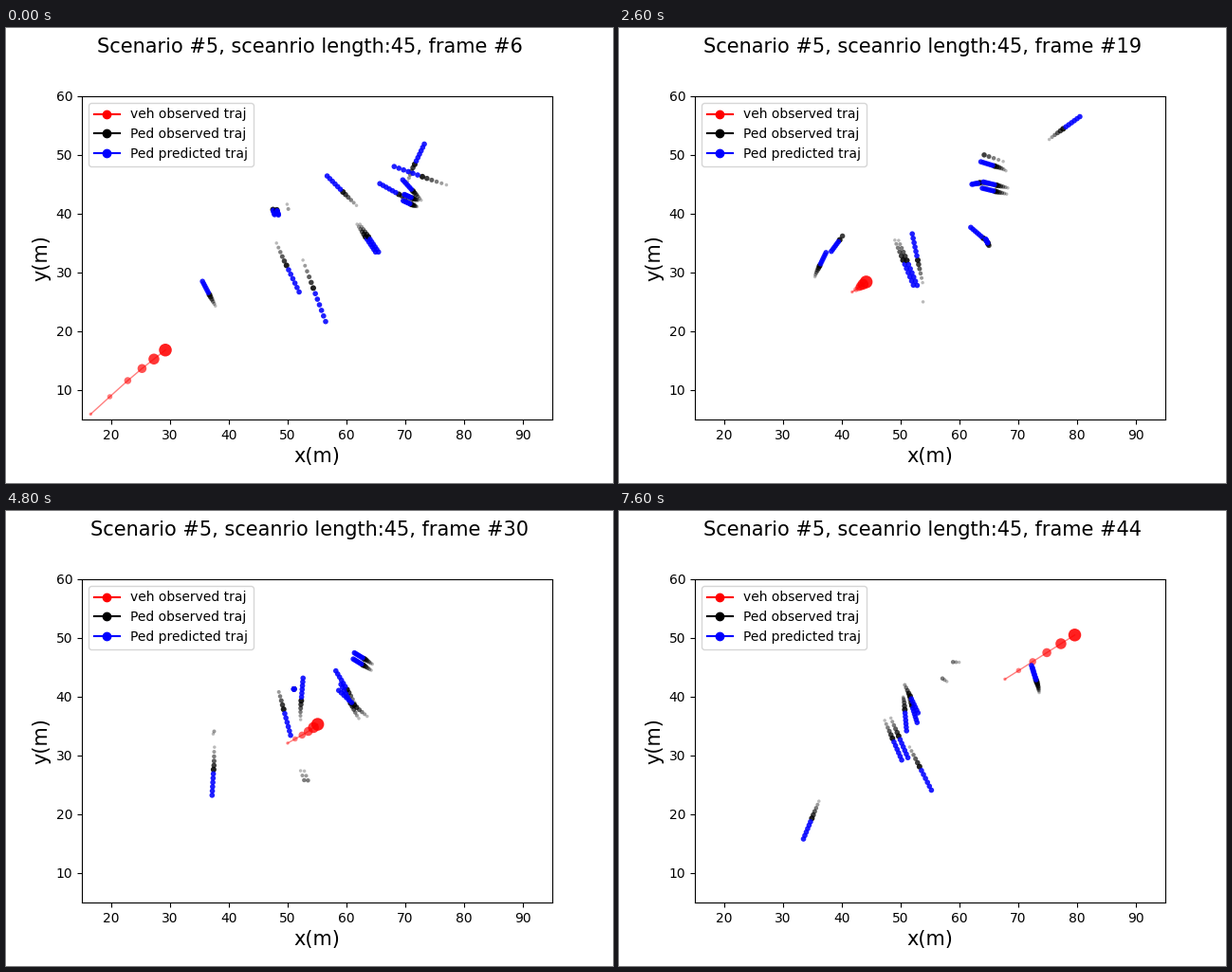
These frames come from a looping animation (640 by 480 pixels, 7800 ms). A matplotlib script:

```python
import numpy as np
import matplotlib.pyplot as plt
from matplotlib.animation import FuncAnimation

FIRST, LAST, WINDOW, AHEAD = 6, 44, 6, 6
RED, BLACK, BLUE = (1, 0, 0), (0, 0, 0), (0, 0, 1)


class Path:
    """Smooth walk through a few (step, x, y) waypoints."""

    def __init__(self, *knots):
        self.t, *xy = np.array(knots, float).T
        self.p = np.stack(xy, axis=1)
        self.v = np.gradient(self.p, self.t, axis=0)
        self.born, self.gone = self.t[0], self.t[-1]

    def at(self, step):
        step = np.clip(step, self.t[0], self.t[-1])
        k = np.clip(np.searchsorted(self.t, step, "right") - 1, 0, len(self.t) - 2)
        h = np.asarray(self.t[k + 1] - self.t[k])[..., None]
        u = np.asarray(step - self.t[k])[..., None] / h
        rise = u * u * (3 - 2 * u)
        return (self.p[k] * (1 - rise) + self.p[k + 1] * rise
                + h * u * (1 - u) * (self.v[k] * (1 - u) - self.v[k + 1] * u))

    def beside(self, dx, dy, gone=LAST):
        """A companion walking at a fixed offset."""
        mate = Path(*np.column_stack([self.t, self.p + (dx, dy)]))
        mate.gone = min(gone, self.gone)
        return mate

    def forecast(self, step):
        ref = max(step, self.born + 2)
        speed = (self.at(ref) - self.at(ref - 2)) / 2
        reach = min(AHEAD, 1 + 2 * (step - self.born))
        return self.at(step) + speed * reach * np.arange(1, AHEAD + 1)[:, None] / AHEAD


vehicle = Path((1, 16.5, 5.9), (3, 22.8, 11.6), (6, 29.2, 16.8), (10, 36.7, 22.7),
               (13, 40.9, 26.1), (15, 42.4, 27.1), (18, 43.6, 28), (23, 47.3, 30.5),
               (25, 50, 32.1), (28, 53.5, 34.1), (30, 55.1, 35.3), (32, 56, 35.8),
               (34, 57.7, 36.9), (37, 63.4, 40.3), (44, 79.6, 50.5))

# West side
west = [
    Path((1, 37.7, 24.3), (6, 36.7, 26.2), (13, 35.4, 28.9), (19, 36.2, 31.1),
         (23, 37, 32.8), (26, 37.5, 34.1)),
    Path((18, 40.1, 36.2), (23, 37.9, 32.9), (30, 37.4, 27.6), (37, 36.5, 23.4),
         (44, 34.9, 19.3)),
]

# Heading south through the centre
pair = Path((6, 47.5, 40.7), (9, 48.3, 38.2), (13, 48.8, 36.1), (19, 50.4, 32.1),
            (27, 52.8, 25.8))
late_pair = Path((31, 46.5, 41), (37, 46.9, 37.2), (44, 48.6, 32.9))
south = [
    Path((1, 49.9, 41.6), (2, 50.1, 40.8)),
    Path((1, 48.1, 35), (6, 49.8, 31.2), (11, 52, 27.6), (14, 53.8, 25)),
    Path((1, 52.6, 32.1), (7, 54.7, 26.4)),
    pair, pair.beside(0.65, -0.05),
    Path((26, 48.5, 40.8), (37, 50.9, 32.8), (44, 53.2, 28.1)),
    Path((30, 51.1, 41.3), (35, 50.9, 41.2), (39, 51.2, 40.7), (44, 51.9, 38.5)),
    Path((34, 51.2, 41.2), (37, 50.5, 40.4), (42, 50.6, 39), (44, 50.7, 37.8)),
    Path((40, 50.7, 42), (44, 51.6, 40.1)),
    late_pair, late_pair.beside(1.05, 0.4),
]

# Heading north
duo = Path((1, 62.3, 38.2), (8, 64.3, 35.2))
last_duo = Path((39, 73.4, 41.1), (42, 73.25, 42.1), (44, 73, 42.9))
north = [
    duo.beside(-0.5, 0, gone=7), duo,
    Path((1, 61.7, 41.4), (6, 59.4, 43.7), (10, 57.8, 45.4)),
    Path((1, 70.4, 45.5), (6, 71.6, 48.4), (13, 74.8, 52.2), (20, 78.1, 54.8)),
    Path((13, 53.9, 27.5), (19, 52.9, 32.1), (25, 52.2, 36.1), (32, 52.4, 40.6)),
    last_duo, last_duo.beside(0.15, -0.4),
]

# Heading west across the north-east
stroll = Path((1, 72, 41.2), (6, 71, 41.6), (13, 68.4, 43.2), (19, 66.1, 43.8),
              (25, 64.2, 44.5), (30, 62.8, 45.4), (37, 60.9, 45.8), (41, 58.9, 45.9))
east = [
    Path((1, 77, 44.9), (6, 72.9, 46.3), (13, 68.2, 48.6), (18, 64.2, 50)),
    Path((1, 72.7, 42.3), (8, 70.6, 44.6), (13, 68.3, 47), (19, 66, 48.1),
         (24, 63.7, 48.5)),
    Path((1, 71.6, 41.7), (6, 68.9, 43.3), (13, 65.2, 44.7), (18, 63.5, 45.3),
         (20, 63.2, 45.1)),
    stroll.beside(0.2, 1.05, gone=38), stroll,
    Path((17, 64.9, 35.1), (23, 62.4, 37.4), (30, 60.1, 41.2), (38, 57.5, 44.6)),
    Path((20, 64.4, 34), (25, 62.1, 36.3), (30, 60.7, 38.9), (38, 57.6, 43.4)),
    Path((18, 65, 34.6), (23, 64.2, 36), (30, 61.3, 38.6), (37, 58.6, 42),
         (41, 57.1, 43.1)),
]
peds = west + south + north + east


def fade(age, newest, oldest):
    return newest + (oldest - newest) * age / (WINDOW - 1)


def rgba(color, alphas):
    return [(*color, a) for a in alphas]


def area(px):
    return (np.asarray(px) * 72 / fig.dpi) ** 2


fig, ax = plt.subplots(figsize=(6.4, 4.8), dpi=100)
ax.set(xlim=(15, 95), ylim=(5, 60), aspect="equal")
ax.set_xlabel("x(m)", fontsize=15)
ax.set_ylabel("y(m)", fontsize=15)
for color, label in [("r", "veh observed traj"), ("k", "Ped observed traj"),
                     ("b", "Ped predicted traj")]:
    ax.plot([], [], "o-", color=color, label=label)
ax.legend(loc="upper left")

title = fig.suptitle("", fontsize=15)
trail, = ax.plot([], [], color="r", lw=1, alpha=0.5)
car = ax.scatter([], [], linewidths=0, zorder=3)
walkers = ax.scatter([], [], linewidths=0, zorder=4)


def put(dots, xy, sizes, colors):
    dots.set_offsets(xy)
    dots.set_sizes(sizes)
    dots.set_facecolor(colors)


def draw(i):
    now = FIRST + i
    steps = np.arange(now - WINDOW + 1, now + 1)
    title.set_text(f"Scenario #5, sceanrio length:45, frame #{now}")

    xy, age = vehicle.at(steps), now - steps
    trail.set_data(*xy.T)
    put(car, xy, area(fade(age, 13.5, 3.5)), rgba(RED, fade(age, 0.88, 0.4)))

    spots, sizes, colors = [], [], []
    for ped in peds:
        seen = steps[(steps >= ped.born) & (steps <= ped.gone)]
        if not len(seen):
            continue
        age = now - seen
        spots.extend(ped.at(seen))
        sizes.extend(area(fade(age, 6, 3.5)))
        colors += rgba(BLACK, fade(age, 0.88, 0.27))
        if now <= ped.gone:
            spots.extend(ped.forecast(now))
            sizes += [area(5.6)] * AHEAD
            colors += rgba(BLUE, [0.88] * AHEAD)
    put(walkers, np.array(spots), sizes, colors)
    return title, trail, car, walkers


anim = FuncAnimation(fig, draw, frames=LAST - FIRST + 1, interval=200,
                     repeat=True, repeat_delay=0, blit=False)
plt.show()
```
